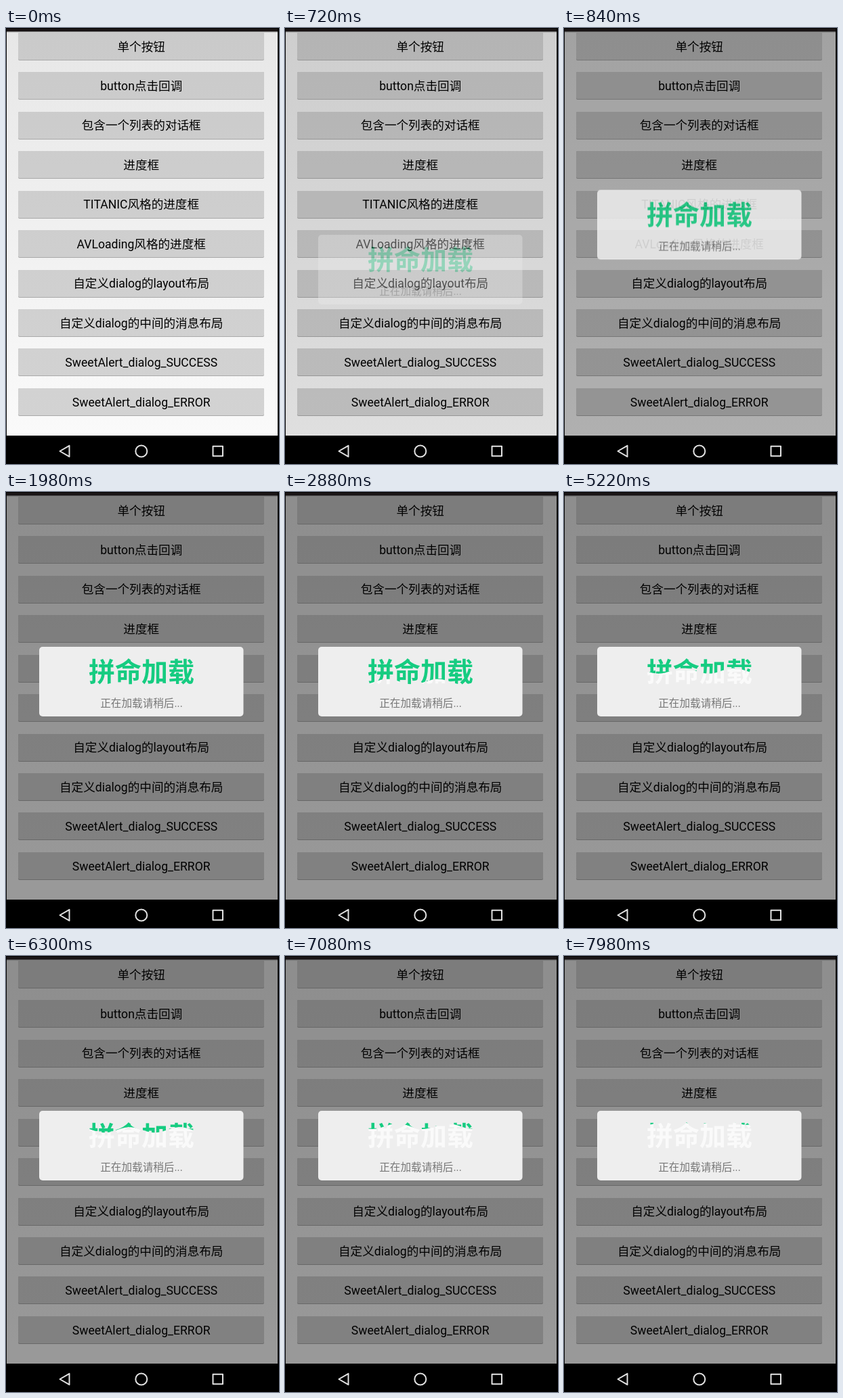
Animation of 403 by 645 pixels, one loop 8 s. Source, as an HTML page with a canvas:

```html
<!DOCTYPE html>
<html lang="zh-CN">
<head>
<meta charset="utf-8">
<style>
html, body { margin: 0; width: 100%; height: 100%; overflow: hidden; background: #000; }
canvas { display: block; width: 403px; height: 645px; }
</style>
</head>
<body>
<canvas id="stage" width="403" height="645"></canvas>
<script>
const W = 403, H = 645, LOOP = 8000, STEP = 60;
const FONT = 'Roboto, "Noto Sans CJK SC", "Noto Sans CJK", sans-serif';
const LABELS = [
  '单个按钮', 'button点击回调', '包含一个列表的对话框', '进度框',
  'TITANIC风格的进度框', 'AVLoading风格的进度框', '自定义dialog的layout布局',
  '自定义dialog的中间的消息布局', 'SweetAlert_dialog_SUCCESS', 'SweetAlert_dialog_ERROR'
];
const BOX = { x: 49, y: 229, w: 301.5, h: 103, r: 5 };
const ENTER = { start: 589, length: 369, rise: 267 };
const WAVE = { length: 74.2, height: 4, speed: 0.0742, rise: 0.00685 };

const ctx = document.getElementById('stage').getContext('2d');
const layer = document.createElement('canvas');
layer.width = W;
layer.height = H;
const dlg = layer.getContext('2d');

const clamp = v => Math.min(1, Math.max(0, v));
const ease = p => (1 - Math.cos(Math.PI * clamp(p))) / 2;

function rect(c, color, x, y, w, h) {
  c.fillStyle = color;
  c.fillRect(x, y, w, h);
}

function rounded(c, color, x, y, w, h, r) {
  c.fillStyle = color;
  c.beginPath();
  c.roundRect(x, y, w, h, r);
  c.fill();
}

function text(c, str, x, y, size, color, weight = 400) {
  c.font = `${weight} ${size}px ${FONT}`;
  c.textAlign = 'center';
  c.fillStyle = color;
  c.fillText(str, x, y);
}

function gradient(top, bottom) {
  const g = ctx.createLinearGradient(0, 5, 0, 603);
  g.addColorStop(0, top);
  g.addColorStop(1, bottom);
  return g;
}

function drawPage() {
  rect(ctx, gradient('#e7e7e7', '#fafafa'), 1, 5, 400, 598);
  const face = gradient('#cacaca', '#d3d3d3');
  LABELS.forEach((label, i) => {
    const mid = 27.2 + i * 58.47;
    const top = Math.round(mid - 20.5);
    rounded(ctx, '#a9a9a9', 18, top, 363, 41, 2);
    rounded(ctx, face, 18, top, 363, 40, 2);
    text(ctx, label, 199.7, mid + 6.3, 17.6, '#000');
  });
  rect(ctx, 'rgba(0,0,0,.4)', 1, 5, 400, 1);
  rect(ctx, 'rgba(0,0,0,.12)', 1, 6, 400, 1);
}

function drawBars() {
  rect(ctx, '#000', 0, 0, W, 1);
  rect(ctx, '#1a1516', 1, 1, 400, 4);
  rect(ctx, '#000', 0, 603, W, 42);
  ctx.strokeStyle = '#e2e2e2';
  ctx.lineWidth = 2;
  ctx.lineJoin = 'round';
  ctx.beginPath();
  ctx.moveTo(79.5, 626);
  ctx.lineTo(93.5, 617.8);
  ctx.lineTo(93.5, 634.2);
  ctx.closePath();
  ctx.stroke();
  ctx.beginPath();
  ctx.arc(199.8, 626, 8.5, 0, Math.PI * 2);
  ctx.stroke();
  ctx.strokeRect(305.5, 618.8, 14.5, 14.5);
}

// Clips to the part of the title on one side of the travelling wave.
function clipWave(t, edge) {
  const mid = 281.5 - (t - 2760) * WAVE.rise;
  const crest = 270 + (t - 7980) * WAVE.speed;
  dlg.beginPath();
  dlg.moveTo(100, edge);
  for (let x = 100; x <= 300; x++) {
    dlg.lineTo(x, mid + WAVE.height * Math.cos((x - crest) / WAVE.length * Math.PI * 2));
  }
  dlg.lineTo(300, edge);
  dlg.closePath();
  dlg.clip();
}

function drawTitle(t, color, edge) {
  dlg.save();
  clipWave(t, edge);
  text(dlg, '拼命加载', 200, 279.5, 39, color, 700);
  dlg.restore();
}

function drawDialog(t) {
  dlg.clearRect(0, 0, W, H);
  rounded(dlg, '#eee', BOX.x, BOX.y, BOX.w, BOX.h, BOX.r);
  drawTitle(t, '#fafafa', 300);
  drawTitle(t, '#16cc81', 200);
  text(dlg, '正在加载请稍后...', 200, 317.7, 15.6, '#777');
}

function draw(time) {
  const t = Math.floor(time / STEP) * STEP;
  const p = clamp((t - ENTER.start) / ENTER.length);
  rect(ctx, '#000', 0, 0, W, H);
  drawPage();
  if (p > 0) {
    rect(ctx, `rgba(0,0,0,${0.388 * ease(p)})`, 1, 5, 400, 598);
    drawDialog(t);
    ctx.globalAlpha = ease(p * 1.12);
    ctx.drawImage(layer, 0, ENTER.rise * Math.pow(1 - p, 2.84));
    ctx.globalAlpha = 1;
  }
  drawBars();
}

const begin = performance.now();
function tick() {
  draw((performance.now() - begin) % LOOP);
  requestAnimationFrame(tick);
}
tick();
</script>
</body>
</html>
```
